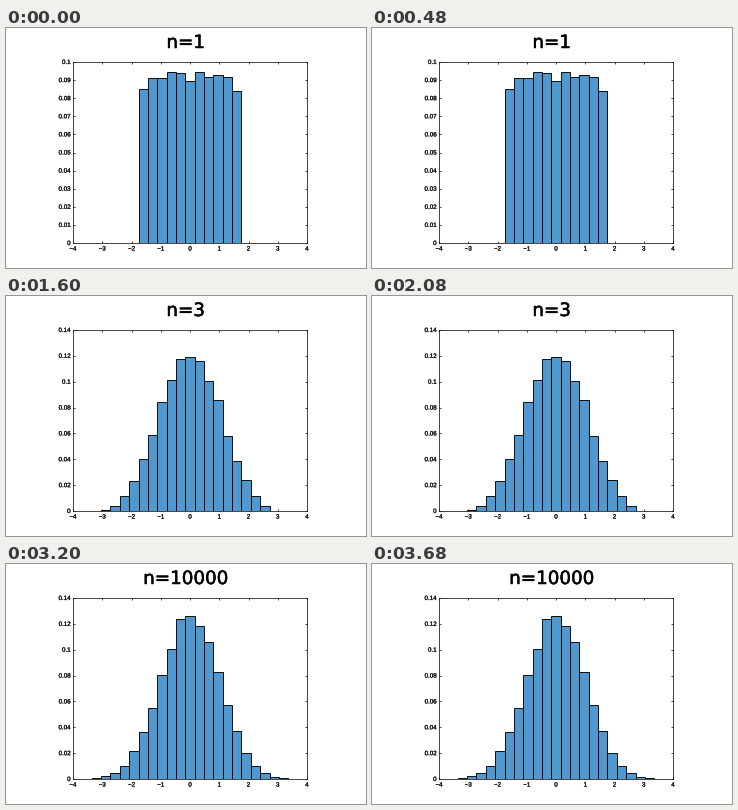
Write a matplotlib script that moves like this. It is 360 px wide and 240 px high and loops after 4000 ms.

```python
import numpy as np
import matplotlib.pyplot as plt
from matplotlib import patheffects
from matplotlib.animation import FuncAnimation

W, H, DPI = 360, 240, 100
PX = 72 / DPI  # one pixel in points
INK = "#1a1a1a"

TERMS = [1, 2, 3, 5, 10000]
MAX_TERMS = 12  # a sum this long is already close to normal
SAMPLES = 40000
EDGES = np.linspace(-4, 4, 26)
MIN_SHARE = 0.00025  # emptier bins are not drawn


def bin_shares(n):
    """Share per bin of the standardised sum of n uniform numbers."""
    k = min(n, MAX_TERMS)
    rng = np.random.default_rng(n)
    sums = rng.uniform(-1, 1, (SAMPLES, k)).sum(axis=1) * np.sqrt(3 / k)
    return np.histogram(sums, EDGES)[0] / SAMPLES


def embolden(text, width):
    text.set_path_effects([patheffects.withStroke(
        linewidth=width * PX, foreground=text.get_color())])


def style_axes(top, step):
    ax.set_xlim(-4, 4)
    ax.set_ylim(0, top)
    ax.set_xticks(range(-4, 5))
    ax.set_yticks(np.arange(0, top + step / 2, step))
    ax.yaxis.set_major_formatter("{x:g}")
    ax.tick_params(direction="in", top=True, right=True, length=2.5 * PX,
                   width=0.8 * PX, color=INK, labelcolor=INK,
                   labelsize=6.2 * PX)
    ax.tick_params(axis="x", pad=3.5 * PX)
    ax.tick_params(axis="y", pad=2.5 * PX)
    ax.set_axisbelow(True)
    for label in ax.get_xticklabels() + ax.get_yticklabels():
        embolden(label, 0.3)
    for spine in ax.spines.values():
        spine.set(linewidth=0.8 * PX, color=INK)


def draw(i):
    n = TERMS[i]
    shares = bin_shares(n)
    shown = shares > MIN_SHARE
    ax.clear()
    ax.bar(EDGES[:-1][shown], shares[shown], width=EDGES[1] - EDGES[0],
           align="edge", facecolor="#5098cd", edgecolor="black",
           linewidth=0.9 * PX)
    style_axes(*((0.10, 0.01) if n == 1 else (0.14, 0.02)))
    title.set_text(f"n={n}")


plt.rcParams["font.family"] = "Liberation Sans"
fig = plt.figure(figsize=(W / DPI, H / DPI), dpi=DPI, facecolor="white")
ax = fig.add_axes([67 / W, 25 / H, 234 / W, 181 / H])
title = fig.text(179.5 / W, 220 / H, "", ha="center", va="baseline",
                 family="DejaVu Sans", fontsize=18.3 * PX, color="black")
embolden(title, 0.5)

anim = FuncAnimation(fig, draw, frames=len(TERMS), interval=800,
                     init_func=lambda: None, repeat=True, repeat_delay=0)
plt.show()
```
